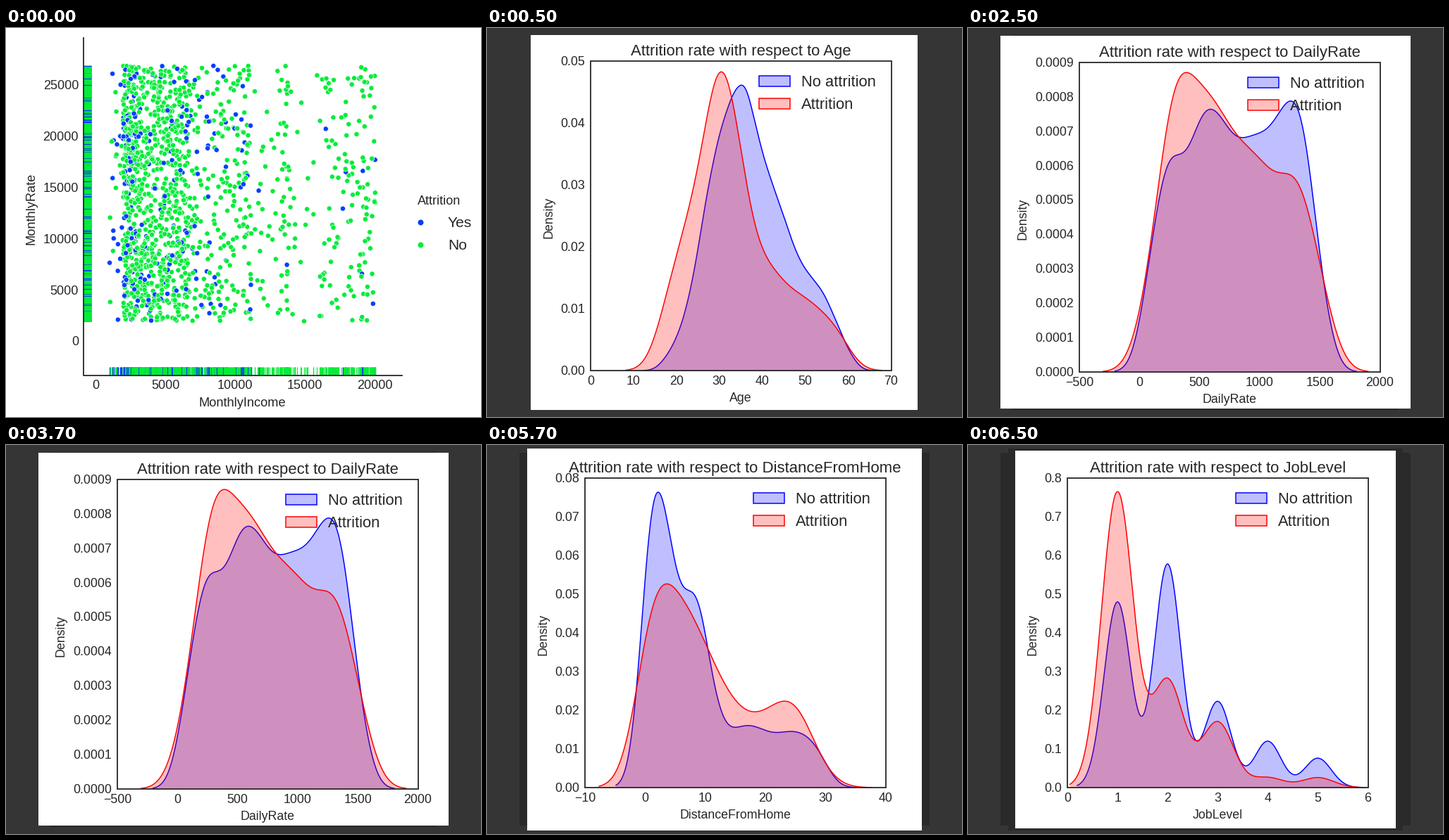
A matplotlib script for the animation above (8000 ms loop, 674 px wide and 553 px high).

```python
import numpy as np
import matplotlib.pyplot as plt
from matplotlib.animation import FuncAnimation
from matplotlib.patches import Rectangle

W, H, DPI = 674, 553, 64
PT = 72 / DPI  # points per pixel
INK, BACKDROP, SHADOW = "#262626", "#353535", "#2a2a2a"
BLUE, GREEN = "#003fff", "#03ed3a"
PLOT_HEIGHT = 440

plt.rcParams["font.family"] = "Liberation Sans"
fig = plt.figure(figsize=(W / DPI, H / DPI), dpi=DPI)


def new_scene():
    ax = fig.add_axes([0, 0, 1, 1])
    ax.set(xlim=(0, W), ylim=(H, 0))
    ax.axis("off")
    return ax


def box(ax, left, top, right, bottom, **style):
    ax.add_patch(Rectangle((left, top), right - left, bottom - top, **style))


def label(ax, x, y, text, size=17.7, ha="center"):
    """Write text whose capitals are centred on height y."""
    ax.text(x, y + 0.358 * size, text, size=size * PT, ha=ha, va="baseline", color=INK)


def side_label(ax, x, y, text, size=17.7):
    ax.text(x, y, text, size=size * PT, rotation=90, ha="center", va="center", color=INK)


def bells(x, centers, width):
    return np.exp(-((x[:, None] - centers) / width) ** 2 / 2)


def kernel_density(low, high, width, heights):
    """Sum of equal-width bells that meets the heights at even steps from low to high."""
    centers = np.linspace(low, high, len(heights))
    weights = np.linalg.solve(bells(centers, centers, width), heights)
    x = np.linspace(low - 3 * width, high + 3 * width, 500)
    return x, np.maximum(bells(x, centers, width) @ weights, 0)


def scatter_points(rng):
    """Uniform crowds, each with left, right, count and share of Yes."""
    crowds = ((147, 166, 28, 0.55), (166, 187, 350, 0.24), (187, 260, 640, 0.11),
              (260, 348, 255, 0.16), (348, 384, 25, 0.1), (384, 406, 45, 0.1),
              (406, 440, 14, 0), (440, 502, 78, 0.02), (502, 524, 54, 0.08))
    xs = np.concatenate([rng.uniform(a, b, n) for a, b, n, _ in crowds])
    share = np.concatenate([np.full(n, s) for _, _, n, s in crowds])
    ys = rng.uniform(53, 417, len(xs))
    colors = np.where(rng.random(len(xs)) < share, BLUE, GREEN)
    order = rng.permutation(len(xs))
    return xs[order], ys[order], colors[order]


def scatter_scene():
    ax = new_scene()
    box(ax, 0, 0, W, H, fc="white")
    xs, ys, colors = scatter_points(np.random.default_rng(7))
    ax.vlines(xs, 482, 494, colors=colors, lw=1.2 * PT, zorder=1)
    ax.hlines(ys, 110, 121, colors=colors, lw=1.2 * PT, zorder=1)
    ax.scatter(xs, ys, s=(7.2 * PT) ** 2, c=colors, edgecolors="white",
               linewidths=0.7 * PT, zorder=2)
    ax.plot([110, 110, 562], [14, 494, 494], color=INK, lw=1.8 * PT, zorder=3)

    for k in range(6):
        label(ax, 103, 445 - 72.9 * k, str(5000 * k), 18, "right")
    for k in range(5):
        label(ax, 127 + 99.1 * k, 507, str(5000 * k), 18)
    label(ax, 335, 531, "MonthlyIncome", 18.2)
    side_label(ax, 36, 257, "MonthlyRate", 18.2)

    label(ax, 584, 245, "Attrition", 18, "left")
    for y, color, text in ((275, BLUE, "Yes"), (307, GREEN, "No")):
        ax.scatter([588], [y + 1], s=(8 * PT) ** 2, c=color, linewidths=0)
        label(ax, 627, y, text, 21, "left")
    return ax


def density_scene(name, panels, corner, x_ticks, y_step, y_count, side_x,
                  no_curve, yes_curve):
    """Two density curves; their heights count in steps of the y axis."""
    ax = new_scene()
    left, top = corner
    right, base = left + 426.5, top + PLOT_HEIGHT
    middle, key_x = (left + right) / 2, right - 188
    box(ax, 0, 0, W, H, fc=BACKDROP, zorder=0)
    for panel in panels[:-1]:
        box(ax, *panel, fc=SHADOW, zorder=0)
    box(ax, *panels[-1], fc="white", zorder=0)

    entries = ((no_curve, (0, 0, 1), "No attrition"), (yes_curve, (1, 0, 0), "Attrition"))
    for k, (curve, color, text) in enumerate(entries):
        value, height = kernel_density(*curve)
        x = np.interp(value, [x_ticks[0], x_ticks[-1]], [left, right])
        y = base - height * PLOT_HEIGHT / y_count
        ax.fill_between(x, y, base, color=color, alpha=0.25, lw=0, zorder=1 + k)
        ax.plot(x, y, color=color, lw=1.5 * PT, zorder=1.5 + k)
        key_y = top + 21 + 31.5 * k
        box(ax, key_x, key_y, key_x + 44, key_y + 15, fc=(*color, 0.25),
            ec=color, lw=1.5 * PT, zorder=4)
        label(ax, key_x + 60.5, key_y + 7.3, text, 21.9, "left")
    box(ax, left, top, right, base, fill=False, ec=INK, lw=1.8 * PT, zorder=3)

    for x, value in zip(np.linspace(left, right, len(x_ticks)), x_ticks):
        label(ax, x, base + 13.5, str(value).replace("-", "\u2212"))
    decimals = round(-np.log10(y_step))
    for k, y in enumerate(np.linspace(base, top, y_count + 1)):
        label(ax, left - 8, y - 0.5, f"{k * y_step:.{decimals}f}", ha="right")
    label(ax, middle, top - 16, "Attrition rate with respect to " + name, 22.1)
    label(ax, middle, base + 37.5, name)
    side_label(ax, side_x, top + 222.5, "Density")
    return ax


PANELS = [(62, 10, 611, 543), (46, 11, 628, 541), (57, 5, 617, 548), (67, 8, 607, 545)]

# Each curve: lowest value, highest value, bell width, heights between them
scenes = [
    scatter_scene(),
    density_scene(
        "Age", PANELS[:1], (147, 47), range(0, 71, 10), 0.01, 5, 87.5,
        (18, 60, 1.93, (0.28, 0.73, 1.58, 2.8, 3.8, 4.43, 4.56, 3.81, 3.09, 2.49,
                        1.91, 1.55, 1.27, 0.83, 0.36)),
        (18, 58, 3.25, (1.33, 2.39, 3.68, 4.81, 3.99, 2.45, 1.72, 1.39, 1.18, 0.95,
                        0.61))),
    density_scene(
        "DailyRate", PANELS[:2], (158, 49), range(-500, 2001, 500), 0.0001, 9, 77.5,
        (102, 1499, 102, (3.74, 6.06, 6.44, 7.43, 7.48, 6.88, 6.88, 7.15, 7.81, 7.08,
                          3.5)),
        (103, 1496, 135, (4.01, 7.98, 8.6, 7.88, 6.95, 6.3, 5.81, 5.46, 3.24))),
    density_scene(
        "DistanceFromHome", PANELS[:3], (139, 47), range(-10, 41, 10), 0.01, 8, 79.5,
        (1, 29, 1.95, (6.96, 7, 5.27, 4.85, 2.96, 1.66, 1.59, 1.55, 1.43, 1.45, 1.36,
                       0.92)),
        (1, 29, 2.88, (4.51, 5.21, 4.4, 3.23, 2.27, 1.96, 2.19, 2, 0.93))),
    density_scene(
        "JobLevel", PANELS, (141, 47), range(7), 0.1, 8, 91.5,
        (1, 5, 0.268, (4.8, 5.78, 2.23, 1.2, 0.76)),
        (1, 5, 0.316, (7.65, 2.83, 1.71, 0.27, 0.26))),
]


def draw(step):
    """Show one scene; the first lasts one step, the others four."""
    current = (step + 3) // 4
    for k, scene in enumerate(scenes):
        scene.set_visible(k == current)
    return scenes


animation = FuncAnimation(fig, draw, frames=16, interval=500, repeat=True,
                          repeat_delay=0, blit=False)
plt.show()
```
